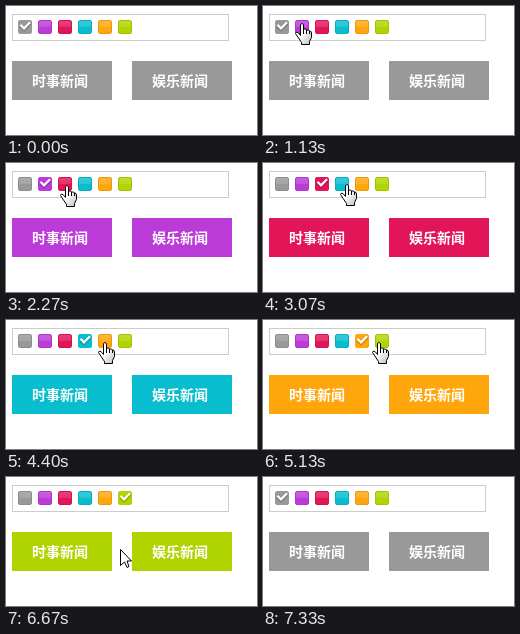
Recreate the animation shown at these times as an HTML page. Size 251 by 129 pixels, loop 7.39 s.

```html
<!DOCTYPE html>
<html lang="zh-CN">
<head>
<meta charset="utf-8">
<title>换肤</title>
<style>
  html, body { margin: 0; width: 100%; height: 100%; overflow: hidden; background: #fff; }
  #stage {
    position: relative; width: 251px; height: 129px; overflow: hidden;
    font-family: "Noto Sans CJK SC", "Noto Sans CJK", sans-serif;
  }
  #stage > * { position: absolute; box-sizing: border-box; }
  #bar { left: 6px; top: 8px; width: 217px; height: 27px; border: 1px solid #ccc; }
  .swatch {
    top: 14px; width: 14px; height: 14px; border-radius: 2px;
    border: 1px solid color-mix(in srgb, var(--c) 92%, #000);
    background: linear-gradient(
      color-mix(in srgb, var(--c) 82%, #fff), color-mix(in srgb, var(--c) 88%, #fff) 50%, var(--c) 50%);
  }
  .swatch.on { background: var(--c); border-color: var(--c); }
  .swatch svg { display: none; position: absolute; left: -1px; top: -1px; }
  .swatch.on svg { display: block; }
  .button {
    top: 55px; width: 100px; height: 39px; padding-left: 20px; background: var(--skin);
    color: #fff; font-size: 14px; font-weight: 700; line-height: 39px;
  }
  #tip {
    left: 118px; top: 43px; width: 46px; height: 19px; border: 1px solid #767676; border-radius: 2px;
    background: linear-gradient(#fff, #e4e5f0); box-shadow: 2px 2px 2px rgba(0, 0, 0, .3);
    color: #575757; font-size: 12px; line-height: 16px; text-align: center;
  }
  .cursor { left: 0; top: 0; overflow: visible; }
  .cursor path { fill: #fff; stroke: #000; stroke-linejoin: round; }
  #hand path { fill: url(#shade); }
  #hand .fingers { fill: none; }
</style>
</head>
<body>
<div id="stage">
  <div id="bar"></div>
  <div class="button" style="left:6px">时事新闻</div>
  <div class="button" style="left:126px">娱乐新闻</div>
  <div id="tip">淡绿色</div>
  <svg id="arrow" class="cursor" width="12" height="19">
    <path d="M.5 .5v16l4-3.5l2.5 5.5l2-1l-2-5.5h4.5z"/>
  </svg>
  <svg id="hand" class="cursor" width="17" height="22">
    <linearGradient id="shade" x2="1" y2="1">
      <stop offset=".45" stop-color="#fff"/><stop offset="1" stop-color="#bbb"/>
    </linearGradient>
    <path d="M5.5 12.5v-11q1.5-2 3 0v4.5h2l1 1h2l1 1q2 0 2 2v4.5l-2 4v3h-8v-2l-6-9q0-2 2.5-1z"/>
    <path class="fingers" d="M8.5 6v5m3-4v4m3-3v3"/>
  </svg>
</div>
<script>
const LOOP = 7390;
const RESET = 7330;
const COLORS = ['#999', '#bb3bd9', '#e31559', '#08bece', '#ffa60c', '#afd400'];
const CLICKS = [0, 1670, 2670, 3730, 4730, 6070];

// Where the pointer enters, then each move: start, duration, destination
const ENTRY = { time: 270, x: 111, y: 86 };
const MOVES = [
  [270, 130, 28, 32],
  [670, 460, 38, 17],
  [1670, 560, 60, 22],
  [2600, 470, 83, 21],
  [3870, 530, 98, 22],
  [4800, 470, 120, 22],
  [6070, 600, 114, 72],
  [7000, 200, 108, 107]
];
const EXIT = 7270;

const $ = id => document.getElementById(id);
const stage = $('stage'), tip = $('tip'), arrow = $('arrow'), hand = $('hand');
const show = (el, on) => { el.style.display = on ? 'block' : 'none'; };

const swatches = COLORS.map((color, i) => {
  const el = document.createElement('div');
  el.className = 'swatch';
  el.style.left = 12 + 20 * i + 'px';
  el.style.setProperty('--c', color);
  el.innerHTML = '<svg width="14" height="14" fill="none">' +
    '<path d="M2.5 5.5l3.5 3.5l6-6" stroke="#0003" stroke-width="4"/>' +
    '<path d="M2.5 4.8l3.5 3.5l6-6" stroke="#fff" stroke-width="2.3"/></svg>';
  stage.insertBefore(el, tip);
  return el;
});

// The picture advances 15 times a second, on a 10 ms grid
function snap(t) {
  const k = Math.floor((Math.floor(t / 10) + 0.5) * 3 / 20);
  return 10 * Math.round(k * 20 / 3);
}

function pointer(t) {
  let { x, y } = ENTRY;
  for (const [start, duration, toX, toY] of MOVES) {
    const u = Math.min(1, Math.max(0, (t - start) / duration));
    const ease = u * u * (3 - 2 * u);
    x += (toX - x) * ease;
    y += (toY - y) * ease;
  }
  return [Math.round(x), Math.round(y)];
}

function draw(t) {
  const skin = t >= RESET ? 0 : CLICKS.filter(c => c <= t).length - 1;
  stage.style.setProperty('--skin', COLORS[skin]);
  swatches.forEach((el, i) => el.classList.toggle('on', i === skin));
  show(tip, t >= 5730 && t < 5870);

  const [x, y] = pointer(t);
  const visible = t >= ENTRY.time && t < EXIT;
  const over = y >= 14 && y < 28 && x >= 12 && x < 126 && (x - 12) % 20 < 14;
  show(hand, visible && over);
  show(arrow, visible && !over);
  hand.style.transform = `translate(${x - 6}px, ${y}px)`;
  arrow.style.transform = `translate(${x}px, ${y}px)`;
}

const begin = performance.now();
function tick() {
  draw(snap((performance.now() - begin) % LOOP));
  requestAnimationFrame(tick);
}
tick();
</script>
</body>
</html>
```
